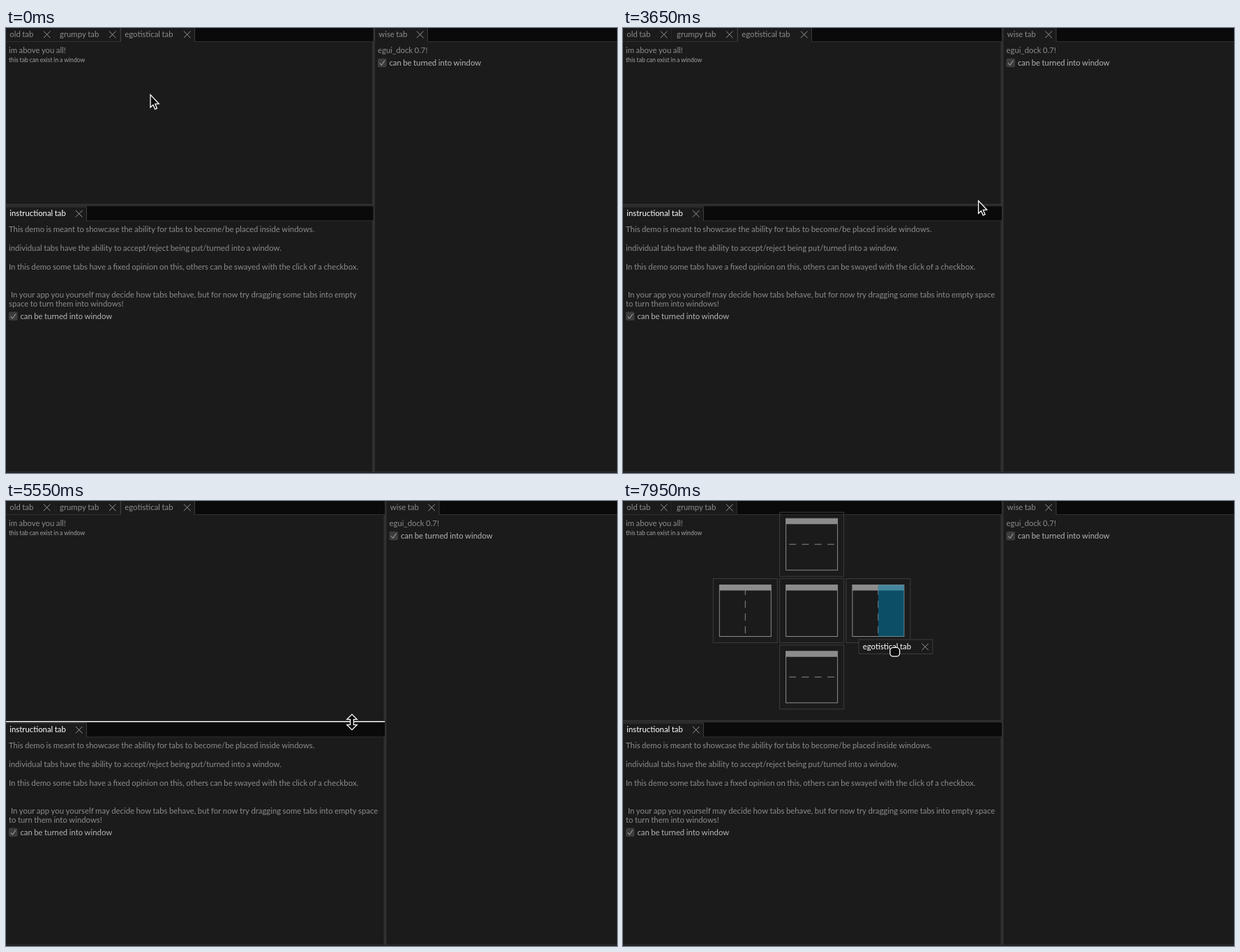
An HTML page with a canvas that plays this animation: 876x639 px, repeating every 8 s.

```html
<!DOCTYPE html>
<html lang="en">
<head>
<meta charset="utf-8">
<title>Docking tabs</title>
<style>
html, body { margin: 0; width: 100%; height: 100%; overflow: hidden; background: #1b1b1b; }
canvas { display: block; }
</style>
</head>
<body>
<canvas id="stage" width="876" height="639"></canvas>
<script>
const ctx = document.getElementById('stage').getContext('2d');
const W = 876, H = 639, LOOP = 8000, STEP = 50;
const BG = '#1b1b1b', BAR = '#0a0a0a', LINE = '#303030', EDGE = '#3c3c3c';
const DIM = '#8c8c8c', MID = '#b4b4b4', LIT = '#ffffff';
const BODY = '11.35px Lato, sans-serif', SMALL = '8.7px Lato, sans-serif';
const LEADING = 13.4;
ctx.wordSpacing = '-0.45px';

const PARAGRAPHS = [
  'This demo is meant to showcase the ability for tabs to become/be placed inside windows.',
  '',
  'individual tabs have the ability to accept/reject being put/turned into a window.',
  '',
  'In this demo some tabs have a fixed opinion on this, others can be swayed with the click of a checkbox.',
  '',
  '',
  ' In your app you yourself may decide how tabs behave, but for now try dragging some tabs into empty space to turn them into windows!'
];

function ease(t, from, to) {
  const u = Math.min(1, Math.max(0, (t - from) / (to - from)));
  return u * u * (3 - 2 * u);
}

// Goes out by one distance, then turns and comes back by another.
const swing = (t, from, turn, to, out, back) =>
  out * ease(t, from, turn) + back * ease(t, turn, to);

const splitX = t => 527 + swing(t, 1750, 2380, 2950, -119, 135.5);
const splitY = t => 254.3 + swing(t, 4550, 5190, 5550, 126.7, -64.7);

function pointer(t) {
  let x = 207, y = 96;
  const go = (from, to, dx, dy) => {
    const e = ease(t, from, to);
    x += dx * e;
    y += dy * e;
  };
  go(600, 1450, 323.5, 16);       // to the vertical splitter
  go(1750, 2250, -119, 14);       // drag it left
  go(2250, 2750, 135, 16);        // and back right
  go(2950, 3400, -27.5, 101);     // down to the horizontal splitter
  go(3480, 3850, -21.5, 12);
  go(4550, 5130, 0, 126);         // drag it down
  go(5130, 5500, -1.5, -63.5);    // and up
  go(5600, 6250, -221, -164.5);   // up to the tab
  go(6250, 6700, -58, -142);
  go(6950, 7950, 172.5, 200);     // drag the tab out
  return [x, y];
}

function cursorKind(t, px, py, sx, sy) {
  const held = (from, to) => t >= from && t < to;
  if (held(7000, LOOP)) return 'grab';
  if (held(1750, 2950) || Math.abs(px - sx) < 4) return 'ew';
  if (held(4550, 5550) || Math.abs(py - sy) < 4) return 'ns';
  return py < 20 ? 'hand' : 'arrow';
}

function rect(x, y, w, h, color) {
  ctx.fillStyle = color;
  ctx.fillRect(x, y, w, h);
}

function frame(x, y, w, h, color) {
  ctx.strokeStyle = color;
  ctx.lineWidth = 1;
  ctx.strokeRect(x, y, w, h);
}

function path(points, color) {
  ctx.beginPath();
  points.forEach(p => ctx.lineTo(...p));
  ctx.strokeStyle = color;
  ctx.lineWidth = 1;
  ctx.stroke();
}

function text(str, x, y, color = DIM, font = BODY) {
  ctx.font = font;
  ctx.fillStyle = color;
  ctx.fillText(str, x, y);
}

function wrap(str, limit) {
  ctx.font = BODY;
  const lines = [];
  let line = null;
  for (const word of str.split(' ')) {
    const next = line === null ? word : line + ' ' + word;
    if (line !== null && ctx.measureText(next).width > limit) {
      lines.push(line);
      line = word;
    } else line = next;
  }
  return [...lines, line];
}

function checkbox(x, cy) {
  ctx.beginPath();
  ctx.roundRect(x, cy - 6.3, 12.6, 12.6, 2);
  ctx.fillStyle = EDGE;
  ctx.fill();
  path([[x + 2.8, cy + .3], [x + 5.3, cy + 3.4], [x + 10, cy - 3.4]], MID);
  text('can be turned into window', x + 16.4, cy + 3.7, MID);
}

function bar(x, top, w) {
  rect(x, top, w, 20.5, BAR);
  rect(x, top + 20, w, 1, LINE);
}

function tabFace(x, top, w, label, color) {
  text(label, x + 5.8, top + 13.9, color);
  const cx = x + w - 10.8, cy = top + 10.4, r = 4.8;
  for (const s of [-r, r]) path([[cx - r, cy - s], [cx + r, cy + s]], '#9a9a9a');
}

function tab(x, top, w, label, color = DIM, active = true) {
  rect(x, top, w, active ? 21 : 20, BG);
  const low = top + 20.5, high = top + .5;
  path([[x, low], [x, high], [x + w, high], [x + w, low]], active ? EDGE : '#282828');
  tabFace(x, top, w, label, color);
}

// Drop target icon; (dx, dy) is the side it stands for.
function target(cx, cy, dx, dy, hot) {
  const x = cx + dx * 95.3, y = cy + dy * 95.3, r = 37;
  frame(x - 46, y - 46, 92, 92, EDGE);
  frame(x - r, y - r, 2 * r, 2 * r, DIM);
  rect(x - r, y - r, 2 * r, 8, DIM);
  for (let i = 0; i < 4 && (dx || dy); i++) {
    const a = -32.5 + i * 18.3;
    if (dy) path([[x + a, y], [x + a + 10, y]], DIM);
    else path([[x, y + a], [x, y + a + 10]], DIM);
  }
  if (hot) rect(x, y - r, r, 2 * r, 'rgba(0,130,180,.5)');
}

const ARROW = [[.7, 1.5], [.7, 16.5], [4.2, 13.2], [7, 19.7], [8.6, 19], [5.9, 12.6], [10.8, 12.2]];
const HALF = [[10.2, 0], [4.5, 5.7], [4.5, 1.8], [-4.5, 1.8], [-4.5, 5.7]];
const RESIZE = [...HALF, ...HALF.map(([x, y]) => [-x, -y])];

function cursor(kind, x, y) {
  ctx.save();
  ctx.translate(x, y);
  if (kind === 'ns') ctx.rotate(Math.PI / 2);
  ctx.beginPath();
  if (kind === 'hand') {
    ctx.roundRect(-1.4, 0, 3, 10, 1.5);
    ctx.roundRect(-4, 6, 13, 9.5, 3);
  } else if (kind === 'grab') {
    ctx.roundRect(-6, 0, 12.5, 11.5, 4);
  } else {
    (kind === 'arrow' ? ARROW : RESIZE).forEach(p => ctx.lineTo(...p));
    ctx.closePath();
  }
  ctx.fillStyle = '#0c0c0c';
  ctx.strokeStyle = LIT;
  ctx.lineWidth = 2.6;
  ctx.stroke();
  ctx.fill();
  ctx.restore();
}

function instructions(sx, sy) {
  const lines = PARAGRAPHS.flatMap(p => wrap(p, sx - 10));
  const base = sy + 38.9;
  lines.forEach((line, i) => text(line, 4, base + i * LEADING));
  checkbox(4, base + lines.length * LEADING);
}

function draggedTab(px, py) {
  const sides = [[0, 0], [-1, 0], [1, 0], [0, -1], [0, 1]];
  if (py > 20) {
    for (const [dx, dy] of sides) {
      target(270.6, 157.5, dx, dy, dx === 1 && px > 320 && py > 111);
    }
  }
  const x = px - 51.5, y = py - 12, w = 106;
  rect(x, y, w, 20.5, BG);
  frame(x, y, w, 20.5, EDGE);
  tabFace(x, y, w, 'egotistical tab', LIT);
}

function draw(t) {
  const sx = splitX(t), sy = splitY(t);
  const [px, py] = pointer(t);
  const kind = cursorKind(t, px, py, sx, sy);
  const dragging = kind === 'grab';

  rect(0, 0, W, H, BG);
  rect(0, 637, W, 1, LINE);
  if (kind !== 'ns') rect(0, sy - 1.8, sx - 1, 3, LINE);
  if (kind !== 'ew') rect(sx - 2, 0, 4, H - 1, LINE);

  bar(0, -1, sx - .5);
  tab(-.5, -1, 70, 'old tab', DIM, false);
  tab(71.2, -1, 92.3, 'grumpy tab', DIM, false);
  if (!dragging) tab(164.5, -1, 106, 'egotistical tab');
  text('im above you all!', 4, 36.2);
  text('this tab can exist in a window', 4, 48.5, '#a0a0a0', SMALL);

  bar(0, sy + 2, sx - .5);
  tab(-.5, sy + 2, 116, 'instructional tab', LIT);
  instructions(sx, sy);

  bar(sx + 1, -1, W - sx);
  tab(sx + 1.5, -1, 76, 'wise tab');
  text('egui_dock 0.7!', sx + 6, 36.2);
  checkbox(sx + 6, 50);

  if (kind === 'ns') rect(0, sy - .3, sx - .5, 1.4, LIT);
  if (kind === 'ew') rect(sx - 1, 0, 1.5, H, LIT);
  if (dragging) draggedTab(px, py);
  cursor(kind, px, py);
}

function tick(now) {
  draw(Math.floor(now % LOOP / STEP) * STEP);
  requestAnimationFrame(tick);
}
requestAnimationFrame(tick);
</script>
</body>
</html>
```
